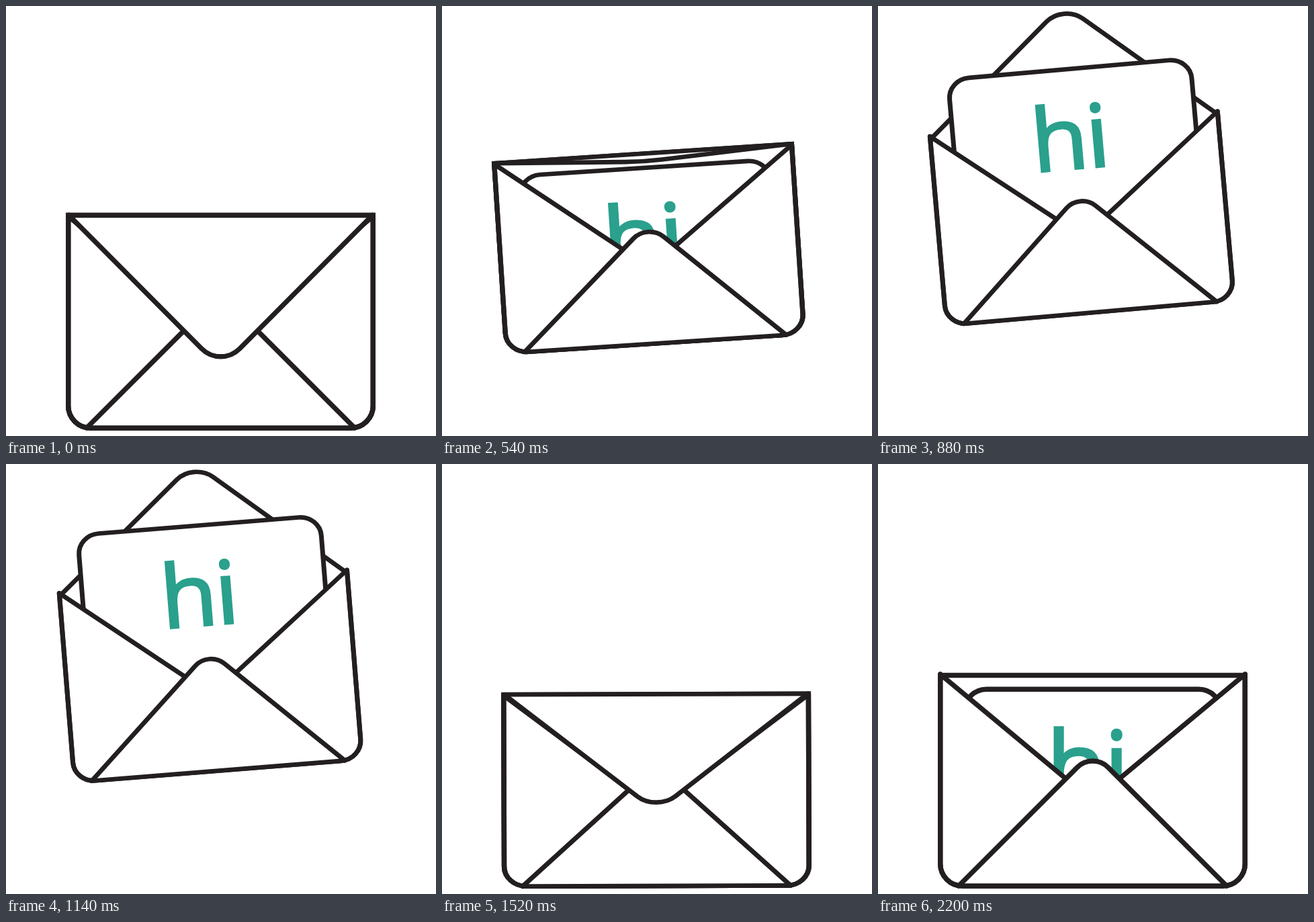
These frames come from a looping animation (640 by 640 pixels, 2220 ms). An HTML page with a canvas:

```html
<!DOCTYPE html>
<html lang="en">
<head>
<meta charset="utf-8">
<title>Envelope</title>
<style>
  html, body { margin: 0; width: 100%; height: 100%; overflow: hidden; background: #fff; }
  canvas { display: block; width: 100vmin; height: 100vmin; }
</style>
</head>
<body>
<canvas id="stage" width="640" height="640" aria-label="An envelope opens and shows a letter that says hi"></canvas>
<script>
const ctx = document.getElementById('stage').getContext('2d');
const LOOP = 2220, STEP = 20;
const INK = '#231f20', PAPER = '#fff', TEAL = '#2aa08d';
const L = 92.7, R = 546.3, T = 311.5, B = 628, CX = 319.5;
const PIVOT = 15; // the envelope turns around a point this far below its base

const sine = p => (1 - Math.cos(Math.PI * p)) / 2;
const sineIn = p => 1 - Math.cos(Math.PI * p / 2);
const outCubic = p => 1 - (1 - p) ** 3;
const outQuart = p => 1 - (1 - p) ** 4;

// Keys are [time, value, easing towards this key]
function track(...keys) {
  return t => {
    if (t <= keys[0][0]) return keys[0][1];
    for (let i = 1; i < keys.length; i++) {
      const [t0, v0] = keys[i - 1], [t1, v1, ease = sine] = keys[i];
      if (t < t1) return v0 + (v1 - v0) * ease((t - t0) / (t1 - t0));
    }
    return keys[keys.length - 1][1];
  };
}

const lift = track([400, 0], [614, -171.5], [1275, -171.5], [1480, 0]);
const turn = track([400, 0], [610, -5], [1100, -5], [1320, 0], [1430, .8], [1530, -.2], [1610, -1], [1740, 0]);
const wide = track([400, 1], [715, .947], [1320, .947], [1500, 1]);
const tall = track([0, 1], [360, .9], [540, .895], [1320, .897], [1500, .9], [1720, 1]);
const rise = track([560, 0], [1100, -122, outCubic], [1375, 0]);
const flap = track([380, 1], [540, .06, sineIn], [1100, -.905, outQuart], [1613, 1]);

function paint(join = 'round') {
  ctx.lineJoin = join;
  ctx.fill();
  ctx.stroke();
}

// Sides and base, from the left corner round to the right one
function hull(top) {
  ctx.moveTo(L, top);
  ctx.arcTo(L, B, CX, B, 33);
  ctx.arcTo(R, B, R, top, 33);
  ctx.lineTo(R, top);
}

function back() {
  ctx.beginPath();
  hull(T);
  ctx.closePath();
  paint('miter');
}

function front() {
  const top = T + 1.5;
  ctx.beginPath();
  hull(top);
  ctx.lineTo(CX, T + 190);
  ctx.closePath();
  paint();
  tip(120, 519, B, 428.5, 32.6);
  ctx.beginPath();
  hull(top);
  ctx.stroke();
}

// Rounded triangle without a base; k scales its height, the line keeps its weight
function tip(x0, x1, base, apex, radius, k = 1) {
  ctx.save();
  ctx.translate(0, base);
  ctx.scale(1, k || 1e-4);
  ctx.beginPath();
  ctx.moveTo(x0, 0);
  ctx.arcTo(CX, apex - base, x1, 0, radius);
  ctx.lineTo(x1, 0);
  ctx.restore();
  paint();
}

function glyph(ch, x, y) {
  const left = x + ctx.lineWidth / 2 + ctx.measureText(ch).actualBoundingBoxLeft;
  ctx.fillText(ch, left, y);
  ctx.strokeText(ch, left, y);
}

function letter(dy) {
  ctx.save();
  ctx.translate(0, dy);
  ctx.beginPath();
  ctx.roundRect(128.5, 335.3, 382, 265, 33);
  paint();
  ctx.font = '400 145px "Open Sans", "Noto Sans", sans-serif';
  ctx.textBaseline = 'alphabetic';
  ctx.fillStyle = ctx.strokeStyle = TEAL;
  ctx.lineWidth = 3.4;
  ctx.lineJoin = 'miter';
  glyph('h', 261, 501.5);
  glyph('i', 346, 501.5);
  ctx.restore();
}

function draw(t) {
  const k = t >= 2200 ? 0 : flap(t);
  const sx = wide(t);
  ctx.setTransform(1, 0, 0, 1, 0, 0);
  ctx.fillStyle = PAPER;
  ctx.fillRect(0, 0, 640, 640);
  ctx.strokeStyle = INK;
  ctx.lineWidth = 7.4;
  ctx.lineCap = 'round';

  ctx.translate(CX - 43 * (1 - sx), B + lift(t) + PIVOT);
  ctx.rotate(turn(t) * Math.PI / 180);
  ctx.translate(0, -PIVOT);
  ctx.scale(sx, tall(t));
  ctx.translate(-CX, -B);

  if (k > 0) {
    back();
    letter(rise(t));
    front();
    tip(L + 1, R - 1, T, T + 227, 40, k);
    // Square top edge of the closed flap
    ctx.lineCap = 'square';
    ctx.beginPath();
    ctx.moveTo(L, T);
    ctx.lineTo(R, T);
    ctx.stroke();
  } else {
    tip(L + 4, R - 4, T + 3, T + 230, 40, k);
    letter(rise(t));
    front();
  }
}

const start = performance.now();
function tick() {
  const t = (performance.now() - start) % LOOP;
  draw(Math.floor(t / STEP) * STEP);
  requestAnimationFrame(tick);
}
tick();
</script>
</body>
</html>
```
